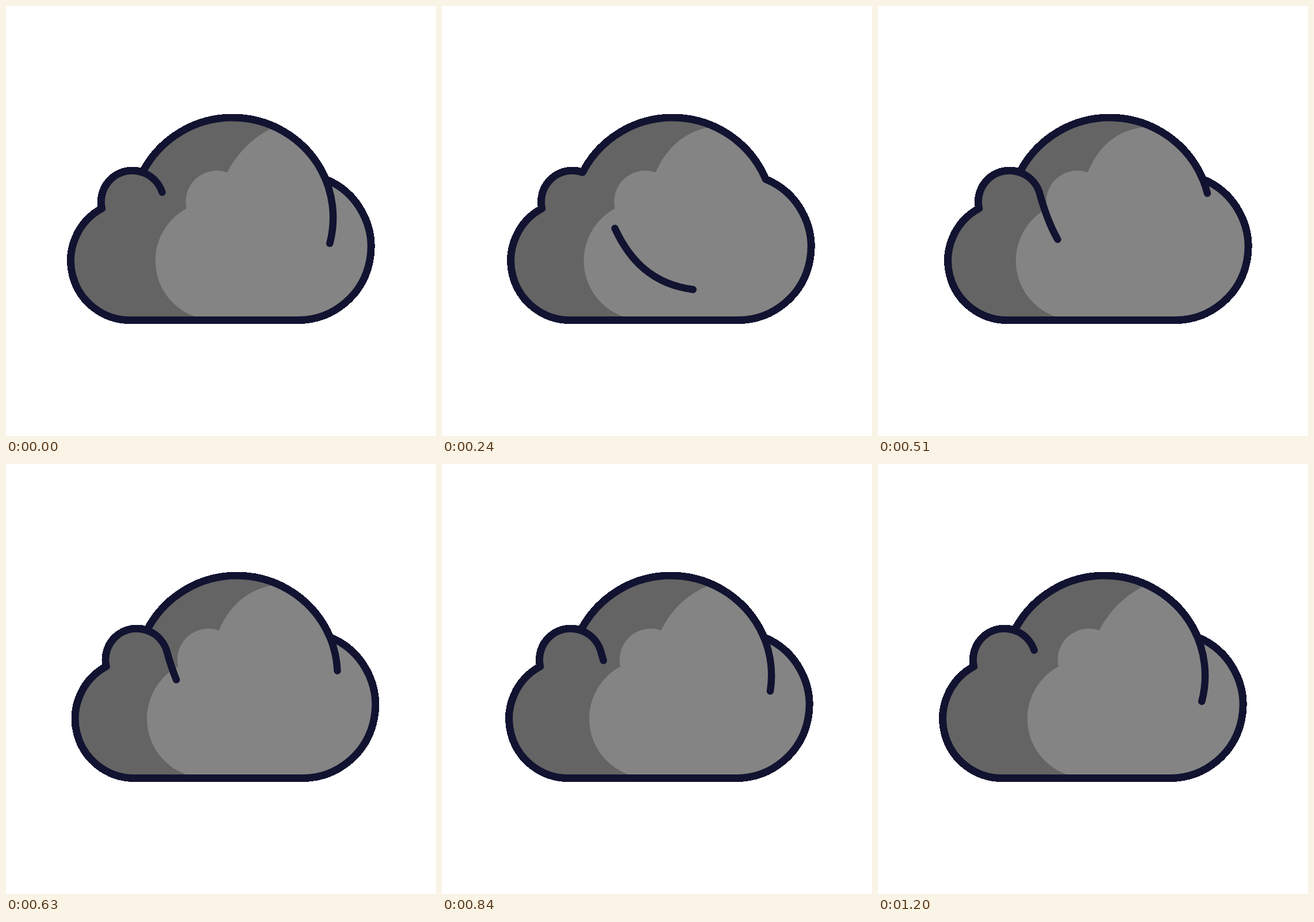
Animation of 748 by 748 pixels, one loop 1.29 s. Source, as an HTML page:

```html
<!DOCTYPE html>
<html lang="en">
<head>
<meta charset="utf-8">
<title>Cloud</title>
<style>
  html, body { margin: 0; width: 100%; height: 100%; overflow: hidden; background: #fff; }
  svg { display: block; width: 100vw; height: 100vh; }
  .line { fill: none; stroke: #121331; stroke-width: 12.5; stroke-linecap: round; stroke-linejoin: round; }
  .rim { stroke-width: 13.5; shape-rendering: crispEdges; }
</style>
</head>
<body>
<svg viewBox="0 0 748 748">
  <defs>
    <path id="shape" d="M215 546.3A103.2 103.2 0 0 1 167 352.3A54 54 0 0 1 237.7 289.5A176 176 0 0 1 556 301.5A127.2 127.2 0 0 1 509 546.3Z"/>
    <clipPath id="inside"><use href="#shape"/></clipPath>
  </defs>
  <g id="cloud">
    <!-- hard outer edge, covered on the inside by the fill -->
    <use href="#shape" class="line rim"/>
    <use href="#shape" fill="#646464"/>
    <g clip-path="url(#inside)"><path id="light" fill="#848484"/></g>
    <use href="#shape" class="line"/>
    <path id="curl" class="line" pathLength="601" stroke-dasharray="181 420"
      d="M548.4 285.5A176 176 0 0 1 563.5 412C549 465 515 495 459 495C343 495 297 418 271.5 323.5A54 54 0 0 0 237.7 289.5"/>
  </g>
</svg>
<script>
const LOOP = 1290, STEP = 30, END = 1200, PEAK = 400;
const cloud = document.getElementById('cloud');
const light = document.getElementById('light');
const curl = document.getElementById('curl');

const ramp = (t, a, b) => Math.min(1, Math.max(0, (t - a) / (b - a)));
const smooth = (t, a, b) => { const u = ramp(t, a, b); return u * u * (3 - 2 * u); };

function bezier(u, x1, y1, x2, y2) {
  const at = (p, a, b) => 3 * a * p * (1 - p) ** 2 + 3 * b * p * p * (1 - p) + p ** 3;
  let lo = 0, hi = 1;
  for (let i = 0; i < 30; i++) {
    const mid = (lo + hi) / 2;
    if (at(mid, x1, x2) < u) lo = mid; else hi = mid;
  }
  return at((lo + hi) / 2, y1, y2);
}

// The left side slides by -22k while the upper end of the edge stays put.
function lightPath(k) {
  const x = v => v - 22 * k;
  return `M${x(362)} 546.3A103.2 103.2 0 0 1 ${x(314)} 352.3` +
    `A54 54 0 0 1 ${x(384.7)} 289.5` +
    `C${x(403)} ${254 - 9 * k} ${432 - 20 * k} ${226.5 - 12.5 * k} 467 210.3` +
    'V150H700V546.3Z';
}

function draw(t) {
  const u = ramp(t, 0, PEAK);
  const dx = 9.5 * (t < PEAK ? u + u * u - u ** 3 : 1 - smooth(t, PEAK, END));
  const k = t < PEAK ? smooth(t, 30, PEAK) : 1 - smooth(t, PEAK, 995);
  const head = -50 + 601 * bezier(t / END, 0.167, 0.167, 0, 1);

  cloud.setAttribute('transform', `translate(${dx} 0)`);
  light.setAttribute('transform', `translate(${-dx} 0)`);
  light.setAttribute('d', lightPath(k));
  curl.setAttribute('stroke-dashoffset', -head);
}

const start = performance.now();
function tick(now) {
  const t = Math.max(0, now - start) % LOOP;
  draw(Math.min(END, Math.floor(t / STEP) * STEP));
  requestAnimationFrame(tick);
}
draw(0);
requestAnimationFrame(tick);
</script>
</body>
</html>
```
